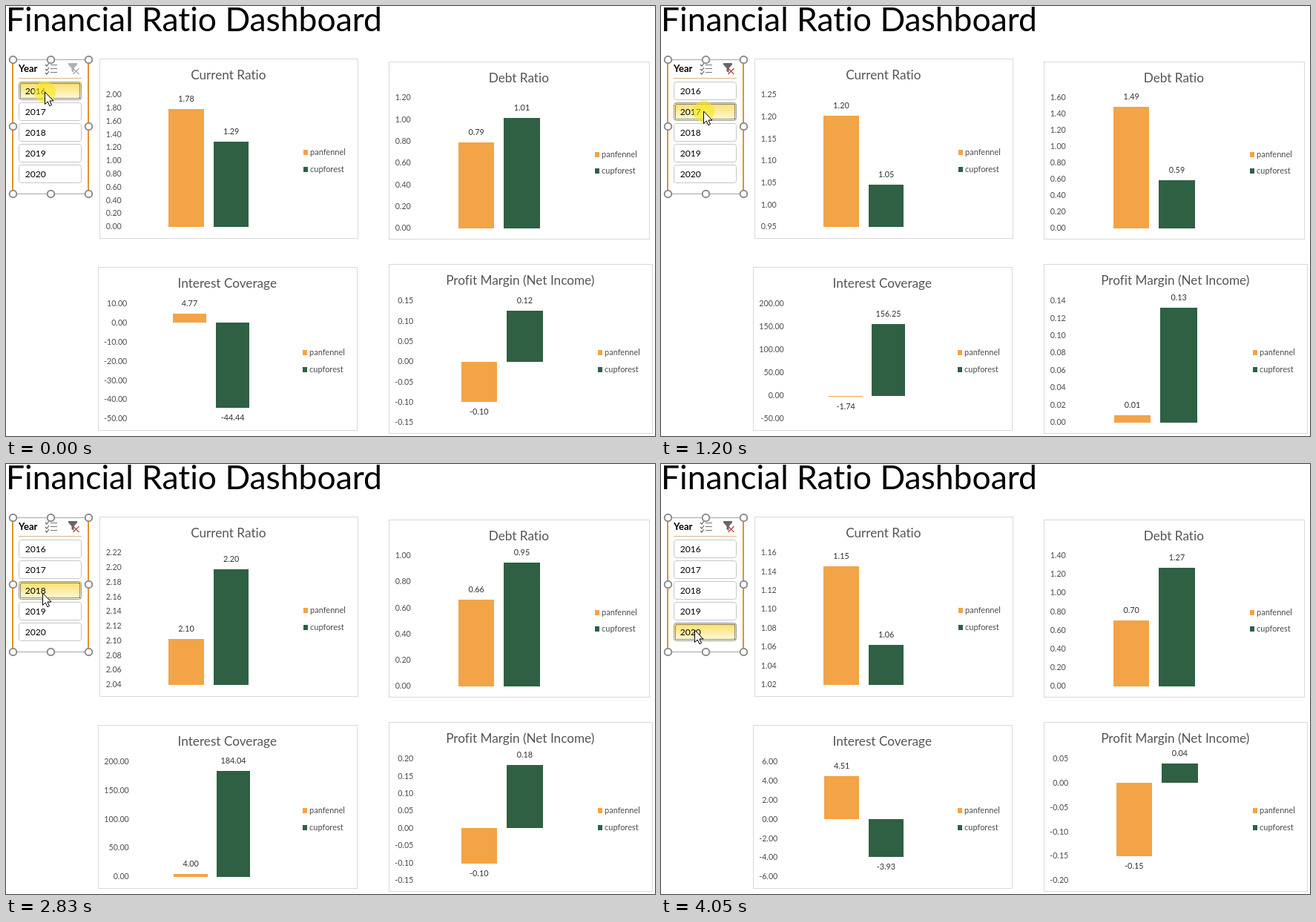
These frames come from a looping animation (875x580 px, 4530 ms). An HTML page:

```html
<!DOCTYPE html>
<html lang="en">
<head>
<meta charset="utf-8">
<title>Financial Ratio Dashboard</title>
<style>
html, body { margin: 0; width: 100%; height: 100%; overflow: hidden; background: #fff; }
svg { display: block; width: 875px; height: 580px; font-family: Lato, Carlito, sans-serif; font-variant-ligatures: none; }
.title { font-size: 44.4px; fill: #000; }
.name { font-size: 17.2px; fill: #555; text-anchor: middle; }
.axis { font-size: 10.7px; fill: #4c4c4c; text-anchor: end; }
.value { font-size: 10.8px; fill: #333; text-anchor: middle; }
.key { font-size: 11px; fill: #4c4c4c; }
.panel { fill: #fff; stroke: #d9d9d9; }
.year { font-size: 12.1px; fill: #000; }
.head { font-size: 13px; font-weight: 700; fill: #000; }
.button { fill: #fff; stroke: #c6c6c6; }
.on .button { fill: url(#gold); stroke: #9a9a9a; }
.focus { fill: none; stroke: #1c2440; stroke-dasharray: 1 1; visibility: hidden; }
.on .focus { visibility: visible; }
.handle { fill: #fff; stroke: #8c8c8c; stroke-width: 2; }
.crisp { shape-rendering: crispEdges; }
</style>
</head>
<body>
<svg viewBox="0 0 875 580">
  <defs>
    <linearGradient id="gold" x1="0" y1="0" x2="0" y2="1">
      <stop offset="0" stop-color="#f8df70"/>
      <stop offset=".45" stop-color="#fcea9a"/>
      <stop offset="1" stop-color="#fffce4"/>
    </linearGradient>
  </defs>
  <text class="title" x="0" y="34">Financial Ratio Dashboard</text>
  <g id="charts"></g>
  <path class="crisp" d="M9 72.5H111M9 253.5H111" stroke="#a6a6a6"/>
  <path class="crisp" d="M9 72V254M111 72V254" stroke="#e3932b" stroke-width="2"/>
  <text class="head" x="17" y="89">Year</text>
  <path class="crisp" d="M17 97.5H102" stroke="#d9b48a"/>
  <path d="M53 79l2 2 3-4M53 85l2 2 3-4M53 90l2 2 3-4" fill="none" stroke="#666" stroke-width="1.2"/>
  <path class="crisp" d="M60 79.5H69M60 84.5H69M60 89.5H69" stroke="#777"/>
  <path id="funnel" d="M84 77H96V79L91.5 84V90L88.5 88V84L84 79Z"/>
  <path id="clear" d="M90.5 84l8 8M98.5 84l-8 8" stroke-width="1.2"/>
  <g id="slicer"></g>
  <circle id="click" r="14.5" fill="#f7e81c" opacity=".62"/>
  <path id="cursor" d="M0 0V16.5L3.8 13L6.4 18.8L9 17.6L6.4 12H11.5Z" fill="#fff" stroke="#000"/>
</svg>
<script>
const LOOP = 4530;
const HOLD = 120;  // press highlight
const LAG = 260;   // press to chart update
const FIRST_YEAR = 2016;
const SERIES = [{ name: 'panfennel', color: '#f3a447' }, { name: 'cupforest', color: '#2f6043' }];

// One row of yearly values per series; plot is the top and bottom of the value axis.
const charts = [
  { title: 'Current Ratio', box: [126, 71, 349, 243], plot: [119.5, 297.5],
    data: [[1.202, 3.12, 2.102, 1.32, 1.1455], [1.046, 1.245, 2.197, .88, 1.062]] },
  { title: 'Debt Ratio', box: [516, 75, 352, 240], plot: [123.5, 299.5],
    data: [[1.487, .5675, .662, .52, .704], [.586, .62, .946, 1.64, 1.266]] },
  { title: 'Interest Coverage', box: [124, 352, 350, 221], plot: [401.5, 556.5],
    data: [[-1.74, 9.29, 4, 7.79, 4.51], [156.25, 22.62, 184.04, -581.2, -3.93]] },
  { title: 'Profit Margin (Net Income)', box: [516, 348, 356, 229], plot: [397.5, 561.5],
    data: [[.0081, -.1363, -.102, -.116, -.1505], [.132, .129, .182, .14, .04]] }
];

// The pointer travels from start to arrive, then presses a year.
const clicks = [
  { start: 0, arrive: 0, press: 0, x: 52.5, y: 116 },
  { start: 870, arrive: 1150, press: 1170, x: 57.5, y: 142 },
  { start: 1570, arrive: 1710, press: 2040, x: 49.5, y: 174 },
  { start: 2830, arrive: 2970, press: 2980, x: 49.5, y: 196 },
  { start: 3710, arrive: 3780, press: 3780, x: 45.5, y: 224 }
];

const $ = id => document.getElementById(id);

function add(parent, tag, attrs, text) {
  const el = document.createElementNS('http://www.w3.org/2000/svg', tag);
  for (const key in attrs) el.setAttribute(key, attrs[key]);
  if (text !== undefined) el.textContent = text;
  parent.appendChild(el);
  return el;
}

const fixed = v => (Math.abs(v) < 1e-9 ? 0 : v).toFixed(2);
const labelWidth = s => [...s].reduce((w, c) => w + (c === '.' ? 3 : c === '-' ? 3.5 : 6), 0);
const mean = list => list.reduce((a, b) => a + b) / list.length;

// Smallest step of 1, 2 or 5 times a power of ten that is not below min.
function niceStep(min) {
  const unit = 10 ** Math.floor(Math.log10(min));
  return unit * [1, 2, 5, 10].find(m => m * unit >= min);
}

// Spreadsheet-style automatic axis: padded ends, zero based unless the values are close.
function autoAxis(values, height) {
  let min = Math.min(...values), max = Math.max(...values);
  const range = max - min;
  if (min < 0) {
    min -= range * .05;
    max += range * .05;
  } else if (range / max > 1 / 6) {
    min = 0;
    max *= 1.05;
  } else {
    min -= range / 2;
    max += range * .05;
  }
  const step = niceStep((max - min) * 18.5 / height);
  return { low: Math.floor(min / step) * step, high: Math.ceil(max / step) * step, step };
}

function drawPanel(parent, { title, box: [x, y, width, height] }) {
  add(parent, 'rect', { class: 'panel', x: x + .5, y: y + .5, width: width - 1, height: height - 1 });
  add(parent, 'text', { class: 'name', x: x + width / 2 - .7, y: y + 28 }, title);
  SERIES.forEach(({ name, color }, i) => {
    const keyX = Math.round(x + width - 74.2);
    const keyY = y + height / 2 + 5 + i * 22.5;
    add(parent, 'rect', { class: 'crisp', x: keyX, y: Math.round(keyY - 3.2), width: 6, height: 7, fill: color });
    add(parent, 'text', { class: 'key', x: keyX + 9, y: keyY + 3.5 }, name);
  });
}

function drawValues(parent, { box: [x, , width], plot: [top, bottom] }, values) {
  const { low, high, step } = autoAxis(values, bottom - top);
  const yOf = v => bottom - (v - low) / (high - low) * (bottom - top);
  const ticks = Array.from({ length: Math.round((high - low) / step) + 1 }, (_, i) => low + i * step);
  const axisX = x + 8.8 + Math.max(...ticks.map(v => labelWidth(fixed(v))));
  ticks.forEach(v => add(parent, 'text', { class: 'axis', x: axisX, y: yOf(v) + 3.7 }, fixed(v)));

  // Two bars with a 27% space between them and a 219% gap around the pair.
  const plotLeft = axisX + 11.2, plotRight = x + width - 95.4;
  const middle = (plotLeft + plotRight) / 2;
  const bar = (plotRight - plotLeft) / 4.46;
  const zero = Math.round(yOf(Math.max(low, 0)));
  values.forEach((v, i) => {
    const from = middle + bar * (i ? .135 : -1.135);
    const left = Math.round(from), right = Math.round(from + bar);
    const end = Math.round(yOf(v));
    const barTop = Math.min(end, zero), barBottom = Math.max(end, zero, barTop + 1);
    add(parent, 'rect', { class: 'crisp', x: left, y: barTop, width: right - left,
      height: barBottom - barTop, fill: SERIES[i].color });
    add(parent, 'text', { class: 'value', x: from + bar / 2, y: v < 0 ? barBottom + 17 : barTop - 10 }, fixed(v));
  });
}

// The first view averages all years; the others show one year each.
charts.forEach(c => drawPanel($('charts'), c));
const views = [-1, ...clicks.keys()].map(year => {
  const group = add($('charts'), 'g', {});
  charts.forEach(c => drawValues(group, c, c.data.map(row => year < 0 ? mean(row) : row[year])));
  return group;
});

const buttons = clicks.map((_, i) => {
  const g = add($('slicer'), 'g', {});
  const y = 102 + i * 28;
  add(g, 'rect', { class: 'button', x: 17.5, y: y + .5, width: 84, height: 24, rx: 3 });
  add(g, 'rect', { class: 'focus crisp', x: 19.5, y: y + 2.5, width: 80, height: 20 });
  add(g, 'text', { class: 'year', x: 25.7, y: y + 17 }, FIRST_YEAR + i);
  return g;
});

for (const cx of [9.5, 60.5, 111.5])
  for (const cy of [72.5, 162.5, 253.5])
    if (cx !== 60.5 || cy !== 162.5) add($('slicer'), 'circle', { class: 'handle', cx, cy, r: 4.8 });

function pointer(t) {
  const i = clicks.filter(c => c.start <= t).length - 1;
  const to = clicks[i], from = clicks[i - 1] || to;
  const p = t < to.arrive ? (t - to.start) / (to.arrive - to.start) : 1;
  const ease = p * p * (3 - 2 * p);
  return [from.x + (to.x - from.x) * ease, from.y + (to.y - from.y) * ease];
}

function draw(t) {
  const picked = clicks.filter(c => c.press <= t).length - 1;
  const view = clicks.filter(c => c.press + LAG <= t).length;
  buttons.forEach((b, i) => b.setAttribute('class', i === picked ? 'on' : ''));
  views.forEach((g, i) => g.setAttribute('visibility', i === view ? 'visible' : 'hidden'));
  $('funnel').setAttribute('fill', view ? '#666' : '#b0b0b0');
  $('clear').setAttribute('stroke', view ? '#b5443a' : '#a8a8a8');
  const at = `translate(${pointer(t)})`;
  $('cursor').setAttribute('transform', at);
  $('click').setAttribute('transform', at);
  $('click').setAttribute('visibility', t < clicks[picked].press + HOLD ? 'visible' : 'hidden');
}

const begin = performance.now();
function tick() {
  draw((performance.now() - begin) % LOOP);
  requestAnimationFrame(tick);
}
tick();
</script>
</body>
</html>
```
